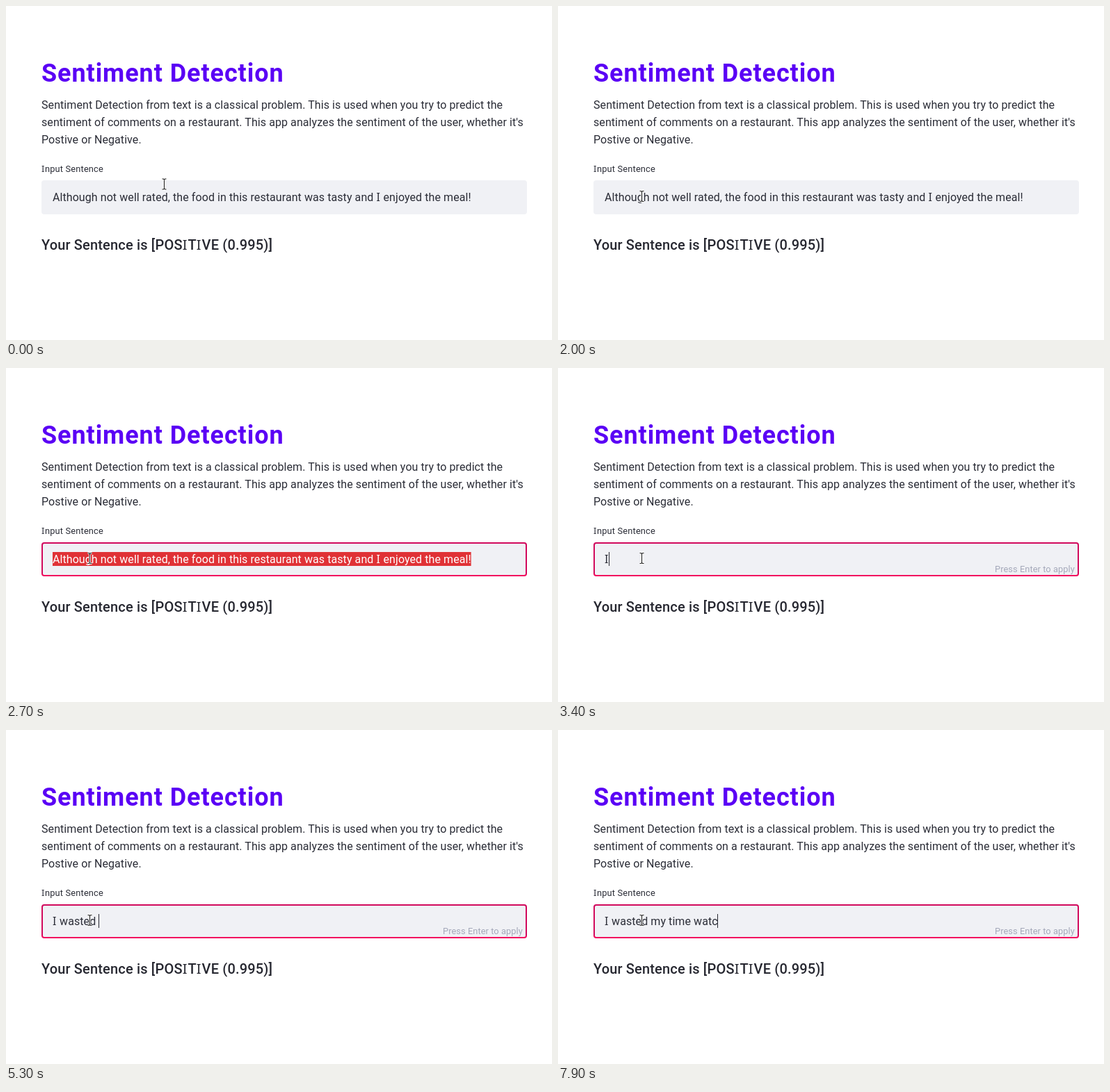
Animation, 785 px wide and 481 px high, one loop 8 s. Source, as an HTML page:

```html
<!DOCTYPE html>
<html lang="en">
<head>
<meta charset="utf-8">
<title>Sentiment Detection</title>
<style>
  html, body { margin: 0; width: 100%; height: 100%; overflow: hidden; background: #fff; }
  svg { display: block; }
  text { font: 16px Roboto, sans-serif; letter-spacing: .075px; fill: #2b2d37; white-space: pre; }
  .title { font-size: 36px; font-weight: 700; letter-spacing: .93px; fill: #5a00f5; }
  .small { font-size: 12.8px; letter-spacing: .18px; }
  .hint { font-size: 12.8px; fill: #a5a9ba; }
  .result { font-size: 20px; font-weight: 500; letter-spacing: .16px; fill: #262730; }
  .serif { font-family: "Noto Sans", sans-serif; letter-spacing: .6px; }
  .result .serif { letter-spacing: 1px; }
  .picked { fill: #fff; }
</style>
</head>
<body>
<svg width="785" height="481" viewBox="0 0 785 481">
  <text class="title" x="51" y="108.5">Sentiment Detection</text>
  <text x="51" y="148">Sentiment Detection from text is a classical problem. This is used when you try to predict the</text>
  <text x="51" y="173">sentiment of comments on a restaurant. This app analyzes the sentiment of the user, whether it's</text>
  <text x="51" y="198">Postive or Negative.</text>
  <text class="small" x="51" y="239"><tspan class="serif">I</tspan>nput Sentence</text>

  <rect x="51" y="251" width="698" height="49" rx="4" fill="#f0f1f5"/>
  <g id="ring" fill="none" stroke-width="2">
    <path d="M52 297V255a3 3 0 0 1 3-3H745a3 3 0 0 1 3 3V297" stroke="#d2095c"/>
    <path d="M52 296a3 3 0 0 0 3 3H745a3 3 0 0 0 3-3" stroke="#f2065e"/>
  </g>
  <rect id="select" x="67" y="265" height="20" fill="#e03236"/>
  <text id="field" x="67" y="281"></text>
  <rect id="caret" y="265" width="1" height="20" fill="#262730"/>
  <text id="hint" class="hint" x="628" y="294">Press Enter to apply</text>

  <text class="result" x="51" y="351">Your Sentence is [POS<tspan class="serif">I</tspan>T<tspan class="serif">I</tspan>VE (0.995)]</text>

  <defs>
    <path id="beam" fill="none" d="M-3 -7.5H-1.2L0 -6.5L1.2 -7.5H3M0 -6.5V6.5M-3 7.5H-1.2L0 6.5L1.2 7.5H3"/>
  </defs>
  <g id="cursor">
    <use href="#beam" stroke="#fff" stroke-width="2.8"/>
    <use href="#beam" stroke="#222" stroke-width="1.1"/>
  </g>
</svg>
<script>
const LOOP = 8000, FRAME = 100;
const OLD = "Although not well rated, the food in this restaurant was tasty and I enjoyed the meal!";

// Pointer: a resting place, then glides to new ones.
const home = { x: 227.5, y: 256.5 };
const glides = [
  { from: 600, to: 800, x: 178, y: 269 },
  { from: 1100, to: 1400, x: 156.5, y: 271 },
  { from: 1700, to: 1800, x: 120.5, y: 274 }
];

// Typing: bursts of keys at an even pace.
const bursts = [
  { text: "I ", from: 3400, pace: 400 },
  { text: "wasted ", from: 4300, pace: 1000 / 6 },
  { text: "my ", from: 5500, pace: 200 },
  { text: "time ", from: 6000, pace: 175 },
  { text: "wa", from: 6900, pace: 200 },
  { text: "tc", from: 7900, pace: 0 }
];
const toFrame = t => Math.round(t / FRAME) * FRAME;
const keys = bursts.flatMap(b =>
  [...b.text].map((char, i) => ({ char, time: toFrame(b.from + i * b.pace) })));

const [ring, select, field, caret, hint, cursor] =
  ["ring", "select", "field", "caret", "hint", "cursor"].map(id => document.getElementById(id));

const clamp = v => Math.min(1, Math.max(0, v));
const easeOut = p => 1 - (1 - p) ** 1.4;
const serifs = s => s.replace(/I/g, '<tspan class="serif">I</tspan>');
const show = (el, on) => el.setAttribute("visibility", on ? "visible" : "hidden");

function pointerAt(t) {
  let { x, y } = home;
  for (const g of glides) {
    const p = easeOut(clamp((t - g.from + FRAME) / (g.to - g.from + FRAME)));
    x += (g.x - x) * p;
    y += (g.y - y) * p;
  }
  return `translate(${x} ${y})`;
}

let last = "";
function setField(text, picked) {
  const state = text + picked;
  if (state === last) return;
  last = state;
  field.innerHTML = `<tspan class="picked">${serifs(text.slice(0, picked))}</tspan>` +
    serifs(text.slice(picked));
  select.setAttribute("width", picked ? field.getSubStringLength(0, picked) : 0);
  caret.setAttribute("x", Math.round(66.6 + field.getComputedTextLength()));
}

function draw(time) {
  const t = Math.floor(time / FRAME) * FRAME;
  const done = keys.filter(k => k.time <= t);
  const typing = done.length > 0;
  const picked = typing || t < 2600 ? 0 : t < 2700 ? "Although".length : OLD.length;

  setField(typing ? done.map(k => k.char).join("") : OLD, picked);
  show(caret, typing && (t - done.at(-1).time) % 1200 < 600);
  show(hint, typing);
  ring.setAttribute("opacity", clamp((t - 2000) / 200));
  cursor.setAttribute("transform", pointerAt(t));
}

const start = performance.now();
function tick() {
  draw((performance.now() - start) % LOOP);
  requestAnimationFrame(tick);
}
tick();
</script>
</body>
</html>
```
